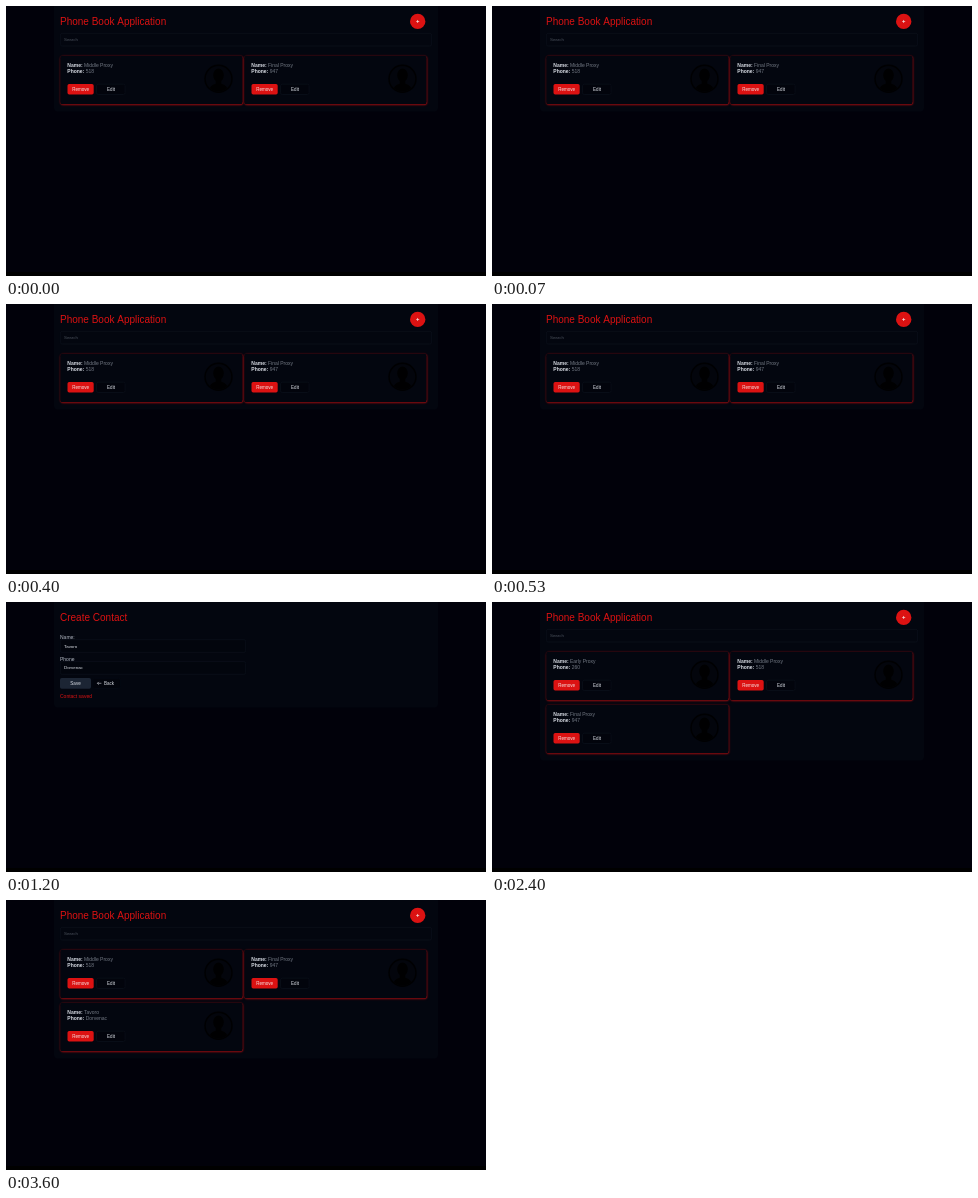
Recreate the animation shown at these times as an HTML page with a canvas. Size 480x270 px, loop 4790 ms.

```html
<!DOCTYPE html>
<html lang="en">
<head>
<meta charset="utf-8">
<title>Phone book</title>
<style>
html, body { margin: 0; width: 100%; height: 100%; overflow: hidden; background: #01010a; }
canvas { display: block; width: 480px; height: 270px; }
</style>
</head>
<body>
<canvas id="stage"></canvas>
<script>
const W = 480, H = 270, LOOP = 4790;
const RED = '#dc1212', PANEL = '#03060f', EDGE = '#0b101a';
const canvas = document.getElementById('stage');
const ctx = canvas.getContext('2d');
const dpr = window.devicePixelRatio || 1;
canvas.width = W * dpr;
canvas.height = H * dpr;
ctx.scale(dpr, dpr);

const early = ['Early Proxy', '260'];
const middle = ['Middle Proxy', '518'];
const final = ['Final Proxy', '947'];
const added = ['Tavoro', 'Dorvenac'];

function text(str, x, y, size, color, bold, align) {
  ctx.font = (bold ? 'bold ' : '') + size + 'px "Liberation Sans", Arial, sans-serif';
  ctx.textAlign = align || 'left';
  ctx.fillStyle = color;
  ctx.fillText(str, x, y);
  return ctx.measureText(str).width;
}

function box(x, y, w, h, r, fill, stroke) {
  ctx.beginPath();
  ctx.roundRect(x, y, w, h, r);
  if (fill) {
    ctx.fillStyle = fill;
    ctx.fill();
  }
  if (stroke) {
    ctx.strokeStyle = stroke;
    ctx.lineWidth = 0.8;
    ctx.stroke();
  }
}

function disc(x, y, r, color) {
  ctx.beginPath();
  ctx.arc(x, y, r, 0, Math.PI * 2);
  ctx.fillStyle = color;
  ctx.fill();
}

function page(bottom) {
  ctx.fillStyle = '#01010a';
  ctx.fillRect(0, 0, W, H);
  ctx.fillStyle = '#000';
  ctx.fillRect(0, 266, W, 4);
  box(48, 0, 384, bottom, [0, 0, 4, 4], PANEL);
}

function avatar(x, y) {
  disc(x, y, 14.2, '#000002');
  disc(x, y, 12.8, '#03050c');
  ctx.save();
  ctx.beginPath();
  ctx.arc(x, y, 12.8, 0, Math.PI * 2);
  ctx.clip();
  ctx.fillStyle = '#000001';
  ctx.beginPath();
  ctx.ellipse(x, y - 3.5, 5.2, 6.8, 0, 0, Math.PI * 2);
  ctx.fill();
  ctx.beginPath();
  ctx.moveTo(x - 2.8, y);
  ctx.lineTo(x - 2.8, y + 5);
  ctx.quadraticCurveTo(x - 9, y + 6.5, x - 10, y + 13);
  ctx.lineTo(x + 10, y + 13);
  ctx.quadraticCurveTo(x + 9, y + 6.5, x + 2.8, y + 5);
  ctx.lineTo(x + 2.8, y);
  ctx.fill();
  ctx.restore();
}

function field(label, value, x, y) {
  const w = text(label, x, y, 5, '#d9dde5', true);
  text(value, x + w + 1.4, y, 5, '#757b86');
}

function card([name, phone], x, y) {
  ctx.save();
  ctx.shadowColor = '#e01010';
  ctx.shadowBlur = 2 * dpr;
  ctx.shadowOffsetX = 0.3 * dpr;
  ctx.shadowOffsetY = 0.5 * dpr;
  box(x, y, 182.3, 48.5, 2.5, PANEL);
  ctx.restore();
  box(x + 0.3, y + 0.3, 181.7, 47.9, 2.3, PANEL);
  field('Name:', name, x + 7, y + 11);
  field('Phone:', phone, x + 7, y + 17);
  box(x + 7.2, y + 28.2, 26.2, 10.5, 1.7, RED);
  text('Remove', x + 20.3, y + 35.1, 4.5, '#f4e9e9', false, 'center');
  box(x + 36.2, y + 28.4, 28.6, 10.3, 1.7, '#02040c', EDGE);
  text('Edit', x + 50.7, y + 35.1, 4.5, '#e1e5ec', false, 'center');
  avatar(x + 158.2, y + 23);
}

function list(people) {
  page(people.length > 2 ? 158.5 : 105.5);
  text('Phone Book Application', 54, 18.6, 10, RED);
  disc(411.7, 15.4, 7.7, RED);
  ctx.fillStyle = '#f4e0e0';
  ctx.fillRect(410.2, 15.1, 3, 0.7);
  ctx.fillRect(411.35, 13.95, 0.7, 3);
  box(54.4, 27.4, 371.2, 12.6, 1.7, null, EDGE);
  text('Search', 58, 35.1, 4.4, '#4d535e');
  people.forEach((p, i) => card(p, 54.3 + (i % 2) * 184, 49.8 + (i >> 1) * 53));
}

function input(label, value, y) {
  text(label, 54, y, 5, '#b4bac5');
  box(54.4, y + 1.1, 185.2, 12.7, 1.7, '#02050d', EDGE);
  text(value, 58, y + 8.9, 4.4, '#e1e5ec');
}

function form() {
  page(105.5);
  text('Create Contact', 54, 18.6, 10, RED);
  input('Name:', added[0], 36.6);
  input('Phone', added[1], 58.5);
  box(54, 76, 31, 10.7, 1.7, '#1c2534');
  text('Save', 69.5, 82.9, 4.5, '#e1e5ec', false, 'center');
  box(86.8, 76.3, 27.6, 10.2, 1.7, '#02040c', '#050913');
  ctx.strokeStyle = '#dce0e8';
  ctx.lineWidth = 0.55;
  ctx.beginPath();
  ctx.moveTo(95.4, 81.3);
  ctx.lineTo(91.4, 81.3);
  ctx.moveTo(92.8, 79.9);
  ctx.lineTo(91.4, 81.3);
  ctx.lineTo(92.8, 82.7);
  ctx.stroke();
  text('Back', 98, 82.9, 4.5, '#e1e5ec');
  text('Contact saved', 54, 96.2, 5, RED);
}

function frame(now) {
  const t = now % LOOP;
  if (t < 1200) list([middle, final]);
  else if (t < 2400) form();
  else if (t < 3600) list([early, middle, final]);
  else list([middle, final, added]);
  requestAnimationFrame(frame);
}

frame(0);
</script>
</body>
</html>
```
